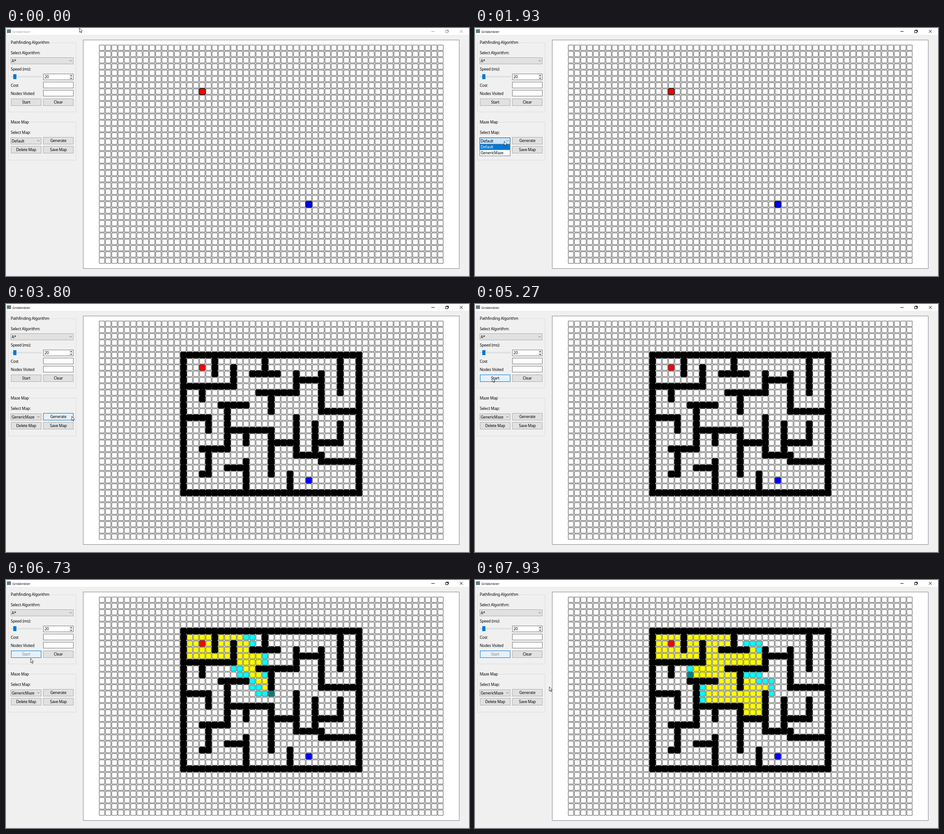
Write an HTML page with a canvas that moves like this. It is 1022 px wide and 548 px high and loops after 8 s.

```html
<!DOCTYPE html>
<html lang="en">
<head>
<meta charset="utf-8">
<title>GridAmbler</title>
<style>
  html, body { margin: 0; width: 100%; height: 100%; overflow: hidden; background: #f0f0f0; }
  canvas { display: block; }
</style>
</head>
<body>
<canvas id="stage" width="1022" height="548"></canvas>
<script>
const ctx = document.getElementById('stage').getContext('2d');
const LOOP = 8000, TICK = 200 / 3;
const COLS = 55, ROWS = 35, PITCH = 13.84, GRID_X = 211.8, GRID_Y = 43.6;
const START = { c: 16, r: 7 }, GOAL = { c: 33, r: 25 };
const UI_FONT = '8.6px "Noto Sans", "Open Sans", sans-serif';
const TITLE_FONT = '7.4px "Open Sans", "Noto Sans", sans-serif';
const BLUE = '#0078d7';

const CLICK_LIST = 1860, CLOSE_LIST = 2330, LEAVE_LIST = 2860;
const PRESS_GENERATE = 3660, SHOW_MAZE = 3795;
const PRESS_START = 5195, RELEASE_START = 5260, SEARCH = 5795;

// Walls: h = row, first column, last column; v = column, first row, last row
const WALLS = {
  h: ['5 13 41', '27 13 41', '10 13 21', '8 24 28', '11 25 31', '9 31 35', '14 35 41', '13 19 23',
      '15 13 17', '17 20 27', '19 27 31', '21 31 35', '19 34 38', '22 35 41', '20 16 20', '24 16 17', '23 20 23'],
  v: ['13 5 27', '41 5 27', '18 5 8', '21 7 10', '16 10 12', '26 5 8', '31 8 11', '35 8 14', '38 5 11',
      '27 11 14', '20 13 20', '17 15 17', '23 17 19', '27 17 24', '31 15 21', '34 16 21', '38 16 19',
      '17 20 24', '23 22 27', '30 24 27']
};

const key = (c, r) => r * COLS + c;
const walls = new Set();
for (const dir of ['h', 'v'])
  for (const wall of WALLS[dir]) {
    const [line, from, to] = wall.split(' ').map(Number);
    for (let i = from; i <= to; i++) walls.add(dir === 'h' ? key(i, line) : key(line, i));
  }

// A* with eight neighbours and straight-line distance; notes the step at which each cell opens and closes
function search() {
  const opened = new Map(), closed = new Map(), cost = new Map([[key(START.c, START.r), 0]]);
  const open = [{ ...START, f: 0 }];
  for (let step = 0; open.length; step++) {
    let best = 0;
    open.forEach((n, i) => { if (n.f < open[best].f) best = i; });
    const [node] = open.splice(best, 1);
    const id = key(node.c, node.r);
    closed.set(id, step);
    if (node.c === GOAL.c && node.r === GOAL.r) break;
    for (let dr = -1; dr <= 1; dr++)
      for (let dc = -1; dc <= 1; dc++) {
        const c = node.c + dc, r = node.r + dr, next = key(c, r);
        if (c < 0 || r < 0 || c >= COLS || r >= ROWS || walls.has(next) || closed.has(next)) continue;
        const g = cost.get(id) + Math.hypot(dc, dr);
        if (g >= (cost.get(next) ?? Infinity) - 1e-9) continue;
        cost.set(next, g);
        const f = g + Math.hypot(GOAL.c - c, GOAL.r - r);
        const queued = open.find(n => n.c === c && n.r === r);
        if (queued) queued.f = f;
        else { open.push({ c, r, f }); opened.set(next, step); }
      }
  }
  return { opened, closed };
}
const { opened, closed } = search();

// Rows of time followed by values, joined by straight lines
const POINTER = [
  [67, 162, 0], [667, 150, 60], [867, 128, 165], [933, 115, 226], [1000, 54, 225], [1400, 64, 243],
  [1600, 64, 243], [1733, 66, 243], [1800, 66, 243], [2333, 60, 272], [2800, 60, 272], [3133, 85, 309],
  [3600, 145, 248], [4267, 145, 248], [4667, 168, 220], [4933, 120, 185], [5133, 38, 163],
  [6600, 38, 163], [7200, 112, 210], [7467, 134, 225], [7933, 164, 236]
];
const STEPS = [[5800, 0], [6267, 23.5], [7200, 70.5], [7933, 105.5]];

function track(rows, t) {
  const i = rows.findIndex(row => row[0] > t);
  if (i === 0) return rows[0].slice(1);
  if (i < 0) return rows[rows.length - 1].slice(1);
  const a = rows[i - 1], b = rows[i], k = (t - a[0]) / (b[0] - a[0]);
  return a.slice(1).map((v, j) => v + (b[j + 1] - v) * k);
}

function fill(x, y, w, h, color) {
  ctx.fillStyle = color;
  ctx.fillRect(x, y, w, h);
}

function box(x, y, w, h, color, border) {
  fill(x, y, w, h, color);
  ctx.strokeStyle = border;
  ctx.lineWidth = 1;
  ctx.strokeRect(x + .5, y + .5, w - 1, h - 1);
}

function line(color, width, ...points) {
  ctx.strokeStyle = color;
  ctx.lineWidth = width;
  ctx.beginPath();
  for (let i = 0; i < points.length; i += 2) ctx.lineTo(points[i], points[i + 1]);
  ctx.stroke();
}

function shape(color, ...points) {
  ctx.fillStyle = color;
  ctx.beginPath();
  for (let i = 0; i < points.length; i += 2) ctx.lineTo(points[i], points[i + 1]);
  ctx.closePath();
  ctx.fill();
}

function text(string, x, midY, color = '#000', align = 'left', font = UI_FONT) {
  ctx.font = font;
  ctx.letterSpacing = font === UI_FONT ? '-0.22px' : '0px';
  ctx.textAlign = align;
  ctx.fillStyle = color;
  ctx.fillText(string, x, midY + 3.1);
}

// Control faces: [fill, border]
const FACE = {
  idle: ['#e1e1e1', '#adadad'],
  hover: ['#e5f1fb', BLUE],
  down: ['#cce4f7', '#005499']
};

function button(label, x, y, state, color) {
  box(x, y, 67, 16, ...FACE[state]);
  text(label, x + 33.5, y + 8, color, 'center');
}

function combo(label, y, w, state) {
  box(10, y, w, 15, ...FACE[state]);
  text(label, 12.5, y + 7.5);
  const x = 10 + w - 6.5;
  line('#555', .9, x - 2.5, y + 6, x, y + 8.5, x + 2.5, y + 6);
}

function group(title, y, h, gap) {
  ctx.strokeStyle = '#dcdcdc';
  ctx.lineWidth = 1;
  ctx.strokeRect(5.5, y + .5, 149, h);
  fill(8, y - 2, gap, 6, '#f0f0f0');
  text(title, 10.5, y);
}

function drawTitleBar(active) {
  const ink = active ? '#000' : '#999';
  fill(0, 0, 1022, 15, '#fff');
  fill(2, 3, 9, 8, '#5f7f80');
  text('GridAmbler', 14, 7.5, ink, 'left', TITLE_FONT);
  line(ink, 1, 939, 7.5, 946, 7.5);
  ctx.strokeRect(970.5, 5.5, 5, 5);
  line(ink, 1, 972, 4.5, 976.5, 4.5, 976.5, 9);
  line(ink, 1, 1002, 4.5, 1008, 10.5);
  line(ink, 1, 1008, 4.5, 1002, 10.5);
}

function drawPanel(t, px, py) {
  const listOpen = t >= CLICK_LIST && t < CLOSE_LIST;
  const free = t < CLICK_LIST || t >= LEAVE_LIST;
  const over = (x, y, w = 67, h = 16) =>
    free && px >= x && px < x + w && py >= y && py < y + h ? 'hover' : 'idle';

  group('Pathfinding Algorithm', 32, 153, 89);
  text('Select Algorithm:', 10.5, 55);
  combo('A*', 65, 139, 'idle');
  text('Speed (ms):', 10.5, 91);
  box(11, 106, 67, 3, '#e7eaea', '#d6d6d6');
  fill(16, 102, 7, 11, BLUE);
  box(82, 101, 67, 14, '#fff', '#7a7a7a');
  text('20', 85, 108.3);
  fill(139, 102, 9, 6, '#f0f0f0');
  fill(139, 109, 9, 5, '#f0f0f0');
  shape('#222', 141.5, 106.3, 146, 106.3, 143.75, 103.8);
  shape('#222', 141.5, 110.2, 146, 110.2, 143.75, 112.7);
  text('Cost', 10.5, 126.7);
  box(82, 119, 67, 14, '#fff', '#7a7a7a');
  text('Nodes Visited', 10.5, 144.7);
  box(82, 137, 67, 14, '#fff', '#7a7a7a');

  const pressed = t >= PRESS_START && t < RELEASE_START;
  const searching = t >= SEARCH;
  button('Start', 11, 156, pressed ? 'down' : searching ? 'hover' : over(11, 156), searching ? '#838383' : '#000');
  button('Clear', 82, 156, over(82, 156));

  group('Maze Map', 207.5, 84, 44);
  text('Select Map:', 10.5, 230.5);
  combo(t < CLOSE_LIST ? 'Default' : 'GenericMaze', 242, 68, free ? over(10, 242, 68, 15) : 'down');
  button('Generate', 82, 241, t >= PRESS_GENERATE && t < SHOW_MAZE ? 'down' : over(82, 241));
  button('Delete Map', 11, 261, over(11, 261));
  button('Save Map', 82, 261, over(82, 261));

  if (listOpen) {
    const chosen = py >= 269 ? 1 : 0;
    box(10, 256, 68, 27, '#fff', '#7a7a7a');
    fill(11, 257 + 12.5 * chosen, 66, 12.5, BLUE);
    ['Default', 'GenericMaze'].forEach((name, i) =>
      text(name, 12.5, 263 + 12.5 * i, i === chosen ? '#fff' : '#000'));
  }
}

function cell(c, r, color, half = 5.9, border = '#505050', width = 1) {
  const x = GRID_X + c * PITCH - half, y = GRID_Y + r * PITCH - half;
  ctx.beginPath();
  ctx.roundRect(x, y, half * 2, half * 2, half > 6 ? 1.5 : 0);
  ctx.fillStyle = color;
  ctx.fill();
  ctx.strokeStyle = border;
  ctx.lineWidth = width;
  ctx.stroke();
}

function drawGrid(t) {
  box(170, 26, 831, 506, '#fff', '#828790');
  const step = t < SEARCH ? -1 : Math.floor(track(STEPS, t)[0]);
  const maze = t >= SHOW_MAZE;
  for (let r = 0; r < ROWS; r++)
    for (let c = 0; c < COLS; c++) {
      const id = key(c, r);
      if (maze && walls.has(id)) continue;
      if (closed.get(id) === step) cell(c, r, '#008080', 6.6);
      else if (closed.get(id) < step) cell(c, r, '#ff0');
      else if (opened.get(id) < step) cell(c, r, '#0ff');
      else cell(c, r, '#fff');
    }
  if (maze) for (const id of walls) cell(id % COLS, Math.floor(id / COLS), '#000', 6.7, '#000');
  const edge = maze ? [6.7, '#555', 1] : [6.8, '#2a2a2a', 1.6];
  cell(START.c, START.r, '#f00', ...edge);
  cell(GOAL.c, GOAL.r, '#00f', ...edge);
}

function drawPointer(x, y) {
  ctx.save();
  ctx.translate(x, y);
  shape('#fff', 0, 0, 0, 9.4, 2.1, 7.5, 3.6, 10.8, 5, 10.2, 3.6, 7, 6.5, 6.9);
  ctx.strokeStyle = '#111';
  ctx.lineWidth = .8;
  ctx.stroke();
  ctx.restore();
}

function frame() {
  const now = performance.now() % LOOP;
  const t = Math.floor((now + 5) / TICK) * TICK % LOOP;
  const [px, py] = track(POINTER, t);
  fill(0, 0, 1022, 548, '#f0f0f0');
  drawTitleBar(t >= CLICK_LIST);
  drawGrid(t);
  drawPanel(t, px, py);
  drawPointer(px, py);
  requestAnimationFrame(frame);
}
frame();
</script>
</body>
</html>
```
